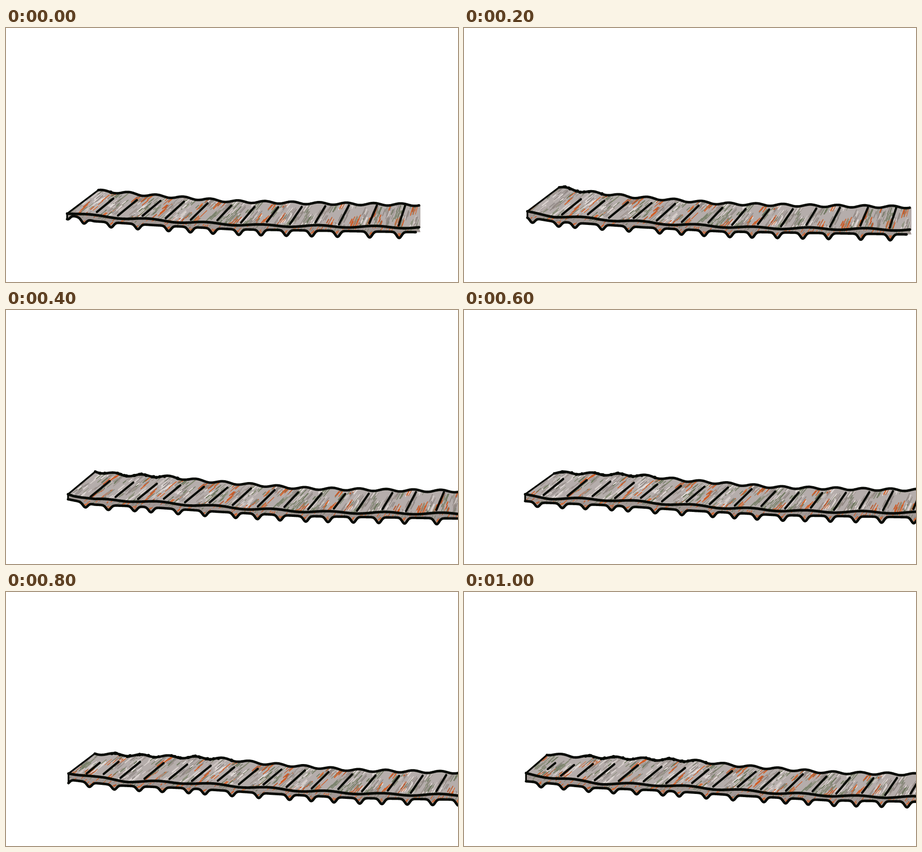
These frames come from a looping animation (998x561 px, 1200 ms). An HTML page with a canvas:

```html
<!DOCTYPE html>
<html lang="en">
<head>
<meta charset="utf-8">
<title>Conveyor</title>
<style>
  html, body { margin: 0; width: 100%; height: 100%; overflow: hidden; background: #fff; }
  canvas { display: block; width: 998px; height: 561px; }
</style>
</head>
<body>
<canvas id="stage" width="998" height="561"></canvas>
<script>
const ctx = document.getElementById('stage').getContext('2d');
const W = 998, H = 561, STEP = 200, START = -170, END = 912, SAMPLE = 1.5;
const INK = '#090c07', TOP = '#b5adab', SIDE = '#a39996';
const GREYS = ['#8e8581', '#968e8b', '#a0958f'], GREENS = ['#78806a', '#858a74', '#6c765c'];
const RUSTS = ['#cf5c26', '#d8662d', '#b85a30'], LIGHTS = ['#dcd4d1', '#cfc6c3', '#e6dfdc'];

// Each pose: belt shift, then the belt's left corners on the stage.
const POSES = [
  { dx: 0,   dy: 0,    top: [204, 358], front: [135, 410], low: 422 },
  { dx: 73,  dy: 5,    top: [210, 352], front: [140, 405], low: 419 },
  { dx: 148, dy: 10.5, top: [197, 357], front: [137, 407], low: 418 },
  { dx: 190, dy: 8.5,  top: [199, 361], front: [135, 407], low: 422 },
  { dx: 267, dy: 10.5, top: [196, 357], front: [138, 401], low: 422 },
  { dx: 303, dy: 15.5, top: [183, 360], front: [137, 400], low: 418 }
];
const SPIKES = [-133, -83, -28, 27, 78, 136, 172, 232, 291, 359, 407, 457, 514, 563,
  619, 675, 732, 803, 868];

let seed = 71;
const rnd = () => (seed = (seed * 16807) % 2147483647) / 2147483647;
const around = spread => (rnd() - .5) * spread;
const pick = list => list[Math.floor(rnd() * list.length)];
const clamp = (x, lo, hi) => Math.max(lo, Math.min(hi, x));

// Straight runs between a few key points.
function ramp(...pts) {
  return u => {
    const i = clamp(pts.findIndex(p => p[0] >= u), 1, pts.length - 1);
    const [a, b] = [pts[i - 1], pts[i]];
    return a[1] + (b[1] - a[1]) * clamp((u - a[0]) / (b[0] - a[0]), 0, 1);
  };
}
const wave = (u, crest, period, size) => -size * Math.cos((u - crest) / period * 2 * Math.PI);

// Belt edges in belt coordinates: u along the belt, v down.
const topLine = ramp([-120, 345], [200, 357], [300, 368], [500, 383], [700, 387.5], [END, 390.5]);
const frontLine = ramp([-166, 388], [0, 407], [137, 411], [400, 429], [560, 436], [END, 440.5]);
const baseLine = ramp([-166, 402], [-13, 417], [137, 423], [320, 435], [500, 444.5], [END, 451]);
const topAt = u => topLine(u) + wave(u, 572, 60, 2.5);
const frontAt = u => frontLine(u) + wave(u, 440, 125, 2.2);
const spikeHeight = u => 10.2 + Math.max(0, u) / 260;
const lowAt = u => SPIKES.reduce(
  (v, s) => v + spikeHeight(s) * Math.exp(-(((u - s) / 7.5) ** 2)), baseLine(u));
const slantAt = u => 1.22 - Math.max(0, u - 320) * .0016;

// Slots sit at an even pitch, tighter at the left end and wider at the right.
function makeSlots() {
  const out = [];
  for (let i = -3; i < 17; i++) {
    const even = 29 + 52 * i;
    const u = even < 0 ? even * .8 : even + Math.max(0, even - 760) * .2;
    const v = topAt(u) + 17 - Math.max(0, u) * .015;
    const drop = (frontAt(u - 38 * slantAt(u)) - 6 - v) * (u < -90 ? .6 : 1);
    out.push({ u, v, run: drop * slantAt(u), drop });
  }
  return out;
}

function streak(u, v, len, width, color) {
  const s = slantAt(u), n = len / Math.hypot(s, 1) / 2;
  return { u, v, du: s * n, dv: n, width, color };
}

// Brushed bands along the slant; rust gathers near the edges.
function makeTopStreaks() {
  const out = [];
  for (let cu = START; cu < END; cu += 6.5) {
    const kind = pick([GREYS, GREYS, GREENS, RUSTS, RUSTS, LIGHTS]);
    const mid = kind === RUSTS ? pick([.08, .9, .92, rnd()]) : rnd();
    for (let k = 0; k < 9; k++) {
      const t = clamp(mid + around(.55), 0, 1);
      const v0 = topAt(cu), h = frontAt(cu) - v0;
      const u = cu + around(13) + slantAt(cu) * h * (.5 - t);
      const color = pick(rnd() < .65 ? kind : pick([GREYS, GREENS, LIGHTS]));
      out.push(streak(u, v0 + t * h, 6 + rnd() * 15, 1 + rnd() * 1.5, color));
    }
  }
  return out;
}

function makeSideStreaks() {
  const out = [];
  for (let u = START; u < END; u += 3) {
    const v = frontAt(u), color = pick(pick([GREYS, GREYS, GREENS, RUSTS]));
    out.push(streak(u, v + rnd() * (lowAt(u) - v), 3 + rnd() * 6, 1 + rnd(), color));
  }
  for (const s of SPIKES)
    for (let k = 0; k < 3; k++)
      out.push(streak(s + around(8), lowAt(s) - 5 - rnd() * 6, 6, 1.6, pick(RUSTS)));
  return out;
}

const slots = makeSlots(), topStreaks = makeTopStreaks(), sideStreaks = makeSideStreaks();
const blots = Array.from({ length: 42 }, () => ({ u: -35 + rnd() * 272, v: around(2), r: 2.8 + rnd() * .9 }));

// Samples an edge in stage space, eased into its left corner.
function edge(fn, { dx, dy }, [x0, y0], end = END) {
  const lift = y0 - fn(x0 - dx) - dy, pts = [];
  for (let x = x0; x <= Math.min(W + 6, end + dx); x += SAMPLE)
    pts.push([x, fn(x - dx) + dy + lift * Math.max(0, 1 - (x - x0) / 60)]);
  return pts;
}

function trace(pts) {
  ctx.beginPath();
  pts.forEach(p => ctx.lineTo(...p));
}
function line(pts, width, color = INK) {
  trace(pts);
  ctx.lineWidth = width;
  ctx.strokeStyle = color;
  ctx.stroke();
}
function panel(pts, color, streaks, { dx, dy }) {
  ctx.save();
  trace(pts);
  ctx.closePath();
  ctx.fillStyle = color;
  ctx.fill();
  ctx.clip();
  for (const s of streaks) {
    const x = s.u + dx, y = s.v + dy;
    line([[x + s.du, y - s.dv], [x - s.du, y + s.dv]], s.width, s.color);
  }
  ctx.restore();
}

function draw(pose) {
  const { dx, dy } = pose, [fx, fy] = pose.front, corner = [fx, pose.low];
  const top = edge(topAt, pose, pose.top);
  const front = edge(frontAt, pose, pose.front);
  const low = edge(lowAt, pose, corner, END - 7);
  const right = END + 3 + dx;

  ctx.fillStyle = '#fff';
  ctx.fillRect(0, 0, W, H);
  ctx.lineCap = ctx.lineJoin = 'round';

  panel([...front, [right, 451 + dy], ...low.toReversed()], SIDE, sideStreaks, pose);
  panel([...top, [right, 391 + dy], [right, 441 + dy], ...front.toReversed()], TOP, topStreaks, pose);

  for (const { u, v, run, drop } of slots)
    if (u + dx > pose.top[0] + 6)
      line([[u + dx, v + dy], [u + dx - run, v + dy + drop]], 4.8);

  line(top, 5.6);
  line(low, 5.6);
  line(front, 5.8);
  line([pose.top, pose.front, corner], 3.8);

  ctx.fillStyle = INK;
  for (const { u, v, r } of blots) {
    const p = top[Math.round((u + dx - pose.top[0]) / SAMPLE)];
    if (!p) continue;
    ctx.beginPath();
    ctx.arc(p[0], p[1] + v, r, 0, 7);
    ctx.fill();
  }
}

let shown;
function tick() {
  const pose = POSES[Math.floor(performance.now() / STEP) % POSES.length];
  if (pose !== shown) draw(shown = pose);
  requestAnimationFrame(tick);
}
tick();
</script>
</body>
</html>
```
